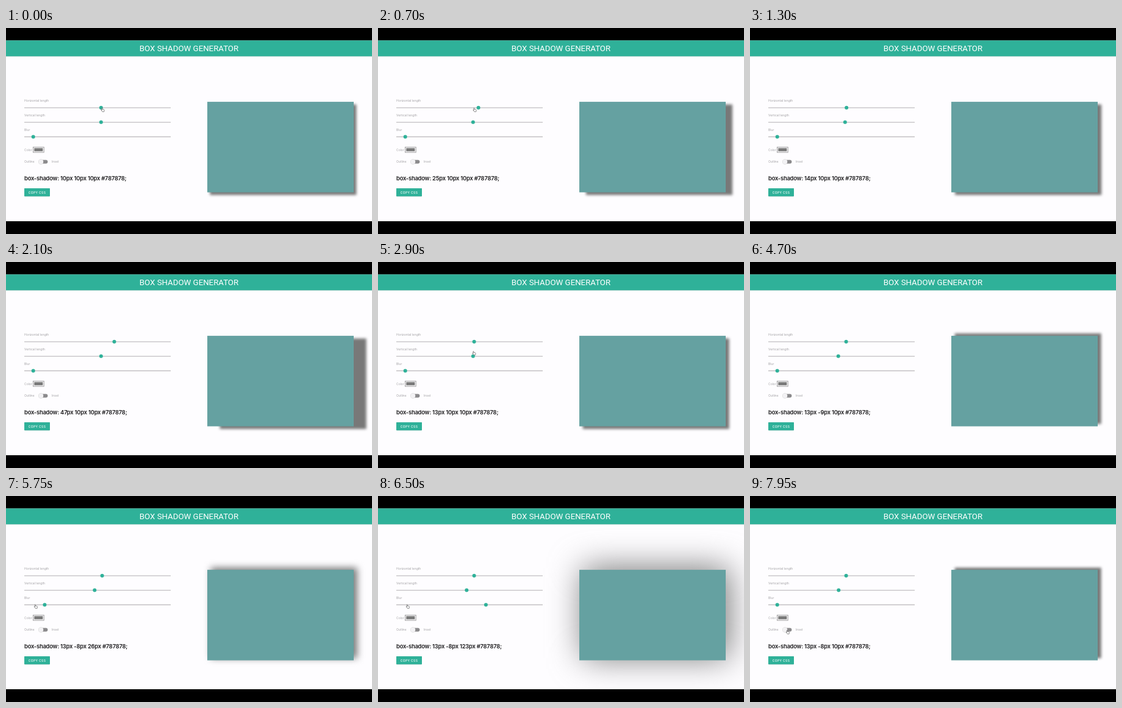
These frames come from a looping animation (600x338 px, 8 s). An HTML page:

```html
<!DOCTYPE html>
<html lang="en">
<head>
<meta charset="utf-8">
<title>Box shadow generator</title>
<style>
  html, body { margin: 0; width: 100%; height: 100%; overflow: hidden; background: #000; }
  svg { position: absolute; left: 0; top: 0; }
  text { font-family: Inter, sans-serif; }
  .title { font: 13.25px Roboto, sans-serif; fill: #fff; text-anchor: middle; }
  .label { font-size: 5px; fill: #a3a1a4; }
  .css { font-size: 9.4px; font-weight: 600; letter-spacing: -.22px; fill: #1c1b1d; }
  .copy { font-size: 5px; font-weight: 500; letter-spacing: .35px; fill: #fff; }
  .track { stroke: #c1bfc2; stroke-width: 1.3; }
  .accent { fill: #2fb199; }
  .raised { filter: drop-shadow(0 .7px .6px rgba(0, 0, 0, .35)); }
</style>
</head>
<body>
<svg width="600" height="338" viewBox="0 0 600 338">
  <rect y="20.4" width="600" height="296.8" fill="#fefdff"/>

  <rect id="shadow" x="330" y="121.1" width="240" height="148.5" fill="#787878"/>
  <rect x="330" y="121.1" width="240" height="148.5" fill="#65a1a1"/>

  <rect class="accent raised" y="20.4" width="600" height="26"/>
  <rect width="600" height="20" fill="#000"/>
  <rect y="317.2" width="600" height="21" fill="#000"/>
  <text class="title" x="300" y="37.8">BOX SHADOW GENERATOR</text>

  <g class="label">
    <text x="30" y="121.3">Horizontal length</text>
    <text x="30" y="145.2">Vertical length</text>
    <text x="30" y="169">Blur</text>
    <text x="30" y="202">Color</text>
    <text x="30" y="221">Outline</text>
    <text x="75" y="221">Inset</text>
  </g>

  <path class="track" d="M30 130.8H270M30 154.6H270M30 178.5H270"/>
  <circle id="thumbX" class="accent" cy="130.8" r="3"/>
  <circle id="thumbY" class="accent" cy="154.6" r="3"/>
  <circle id="thumbBlur" class="accent" cy="178.5" r="3"/>

  <rect x="44.4" y="195.3" width="17.8" height="8.8" fill="#f0eff0" stroke="#858486" stroke-width=".7"/>
  <rect x="46.3" y="197.2" width="14" height="5" fill="#787878"/>

  <rect x="54" y="216.4" width="14.4" height="6" rx="3" fill="#8b8a8c"/>
  <circle class="raised" cx="57.3" cy="219.4" r="4" fill="#f3f2f4"/>

  <text id="css" class="css" x="30" y="250.2"></text>
  <rect class="accent raised" x="30" y="263.1" width="42" height="13.2" rx=".8"/>
  <text class="copy" x="36.8" y="271.7">COPY CSS</text>

  <path id="hand" fill="#fff" stroke="#333" stroke-width=".55" stroke-linejoin="round"
    d="M-1.3 -2.6q.5 -.7 1 0l.5 2 .9 -.2 .9 .4 .7 .3q.4 1.4 -.1 3.2h-2.9q-.7 -1.2 -2 -2.5 -.1 -.9 .9 -.4l.4 .4z"/>
</svg>
<script>
  const LOOP = 8000, STEP = 50, SCALE = 600 / 1366;
  const $ = id => document.getElementById(id);

  // Eased progress from 0 to 1 between two times
  function ease(t, from, to) {
    const u = Math.min(1, Math.max(0, (t - from) / (to - from)));
    return u * u * (3 - 2 * u);
  }

  function setThumb(id, share) {
    $(id).setAttribute("cx", 33 + 234 * share);
  }

  function draw(t) {
    const go = (from, to) => ease(t, from, to);

    // Each slider is dragged out and back
    const x = Math.round(10 + 20 * go(150, 950) - 16 * go(950, 1300)
                            + 33 * go(1450, 2100) - 34 * go(2150, 2650));
    const y = Math.round(10 + 42 * go(3100, 3250) - 100 * go(3250, 3700) + 40 * go(3900, 4790));
    const blur = Math.round(10 + 117 * go(5600, 6250) - 117 * go(6400, 7250));

    setThumb("thumbX", (x + 200) / 400);
    setThumb("thumbY", (y + 200) / 400);
    setThumb("thumbBlur", blur / 200);
    $("css").textContent = `box-shadow: ${x}px ${y}px ${blur}px #787878;`;
    $("shadow").setAttribute("transform", `translate(${x * SCALE} ${y * SCALE})`);
    $("shadow").style.filter = `blur(${blur * SCALE / 2}px)`;

    // The hand visits each slider, then the switch
    const toY = go(2700, 3050), toBlur = go(5050, 5500), toSwitch = go(7400, 7900);
    const handX = 158.2 - 1.7 * toY - 108 * toBlur + 13 * toSwitch;
    const handY = 134.2 + 25 * toY + 22 * toBlur + 42 * toSwitch;
    const away = (t >= 1000 && t < 2400) || (t >= 4000 && t < 4950);
    $("hand").setAttribute("transform", `translate(${handX} ${handY})`);
    $("hand").setAttribute("visibility", away ? "hidden" : "visible");
  }

  const start = performance.now();
  function tick() {
    const t = (performance.now() - start) % LOOP;
    draw(Math.floor(t / STEP) * STEP);
    requestAnimationFrame(tick);
  }
  tick();
</script>
</body>
</html>
```
